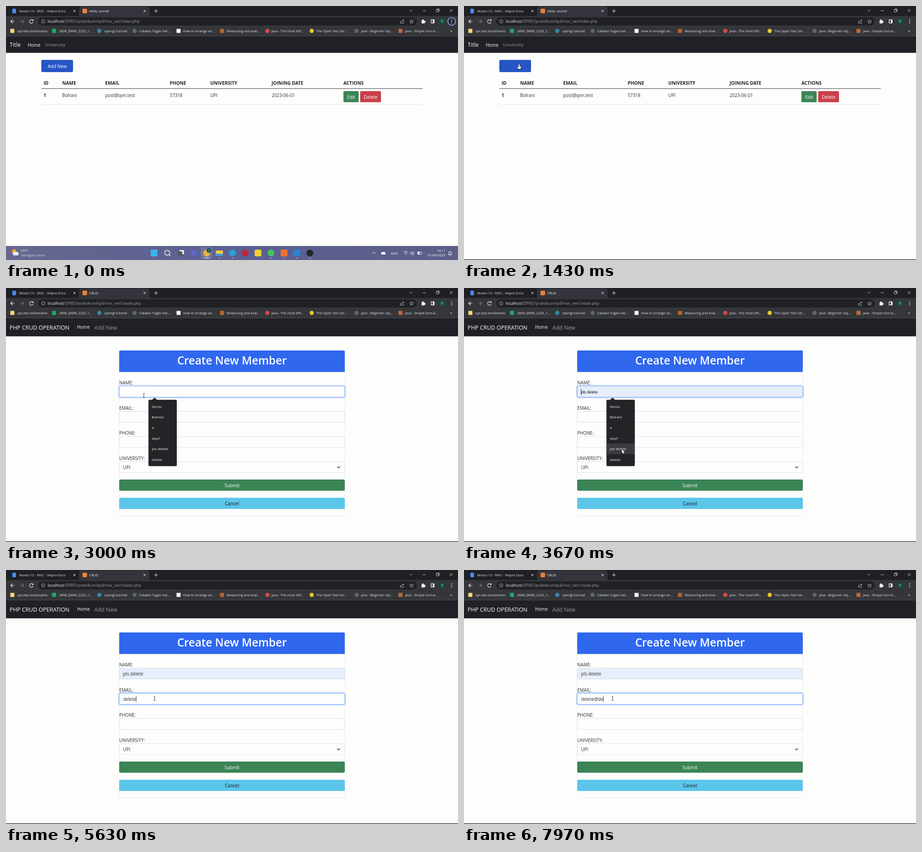
An HTML page with a canvas for the animation above (8000 ms loop, 998x561 px).

```html
<!DOCTYPE html>
<html lang="en">
<head>
<meta charset="utf-8">
<title>Member form</title>
<style>
html, body { margin: 0; width: 100%; height: 100%; overflow: hidden; background: #fdfdfc; }
canvas { display: block; width: 998px; height: 561px; }
</style>
</head>
<body>
<canvas id="stage" width="998" height="561"></canvas>
<script>
const ctx = document.getElementById('stage').getContext('2d');
const LOOP = 8000, PAGE_CHANGE = 1780;
const INK = '#2b2f33', PAPER = '#fdfdfc', PALE = '#e4e6e9';

// Drawing helpers
function box(x, y, w, h, fill, radius = 0, border, width = 0.7) {
  ctx.beginPath();
  ctx.roundRect(x, y, w, h, radius);
  if (fill) { ctx.fillStyle = fill; ctx.fill(); }
  if (border) { ctx.strokeStyle = border; ctx.lineWidth = width; ctx.stroke(); }
}
function dot(x, y, r, fill, border, width = 1) {
  box(x - r, y - r, 2 * r, 2 * r, fill, r, border, width);
}
function stroke(path, color = '#e8eaed', width = 1) {
  ctx.strokeStyle = color;
  ctx.lineWidth = width;
  ctx.stroke(new Path2D(path));
}
// y is the middle of the capital letters
function text(s, x, y, size = 9.9, color = INK, weight = 400, align = 'left', family = '"Open Sans"') {
  ctx.font = `${weight} ${size}px ${family}, sans-serif`;
  ctx.textAlign = align;
  ctx.fillStyle = color;
  ctx.fillText(s, x, y + size * 0.357);
  return ctx.measureText(s).width;
}
function ease(t, from, to) {
  const p = Math.min(1, Math.max(0, (t - from) / (to - from)));
  return p * p * (3 - 2 * p);
}

// Pointer route: time, x, y
const ROUTE = [
  [650, 560, 340], [1350, 121.5, 128.5], [1850, 121.5, 128.5], [2220, 303, 234],
  [2950, 303, 234], [3450, 348.7, 356.5], [3950, 348.7, 356.5], [4500, 328, 284], [LOOP, 328, 284]
];
function pointerAt(t) {
  const i = Math.max(1, ROUTE.findIndex(k => k[0] > t));
  const [t0, x0, y0] = ROUTE[i - 1], [t1, x1, y1] = ROUTE[i];
  const p = ease(t, t0, t1);
  return { x: x0 + (x1 - x0) * p, y: y0 + (y1 - y0) * p };
}
const inside = (p, x, y, w, h) => p.x >= x && p.x <= x + w && p.y >= y && p.y <= y + h;

const ARROW = new Path2D('M0 0V8.6L2.1 6.8 3.5 9.8 4.8 9.2 3.5 6.3H6.2Z');
const HAND = new Path2D('M-1 0Q0-1 1 0V4L4 4.8V8L3 10.5H-1.5L-4 6.5-3 5.5-1 7Z');
function drawPointer(p, shape) {
  ctx.save();
  ctx.translate(p.x, p.y);
  if (shape === 'beam') {
    stroke('M-2-4H2M0-4V4M-2 4H2', '#333', 0.9);
  } else {
    const path = shape === 'hand' ? HAND : ARROW;
    ctx.fillStyle = '#fff';
    ctx.strokeStyle = '#111';
    ctx.lineWidth = 1.2;
    ctx.stroke(path);
    ctx.fill(path);
  }
  ctx.restore();
}

// Browser window
const BOOKMARKS = [
  [14, 'upi.edu bookmarks', '#f5d878', 25, 1], [106, '2808_DMW_2223_1...', '#23a566', 117, 1],
  [206, 'opengl tutroial', '#3c84a8', 217], [284, 'Layanan'.length && 'Catatan Tugas Har...', '#5b6478', 294],
  [381, 'How to arrange an...', '#f2f2f2', 391, 1], [477, 'Measuring and eval...', '#b5652d', 487, 1],
  [577, 'java - The most effi...', '#d14b45', 586], [675, 'The Open Test Ser...', '#e5c62f', 685],
  [774, 'java - Beginner obj...', '#60636a', 784], [871, 'java - Simple turn-b...', '#b9693a', 881, 1]
];
BOOKMARKS[3][1] = 'Catatan Tugas Har...';

function drawBrowser(tab, file, menuRing) {
  box(0, 0, 998, 24, '#1f2024');
  box(161, 1, 156, 26, '#34353c', 5);
  box(0, 22, 998, 45, '#35363a');
  box(0, 66, 998, 1, '#4a4b4f');
  box(14, 6, 8, 10, '#4a8af4', 1);
  text('Modul 10 - MVC - Velpra Docs', 29, 11, 7.5, '#dfe1e5');
  box(169, 6, 10, 10, '#ed8136', 2);
  text(tab, 183.5, 11, 7.5, '#f1f3f4');
  stroke('M148.500 8.500l5 5m0-5l-5 5M303.500 8.500l5 5m0-5l-5 5M327 11h8m-4-4v8');
  stroke('M891 8.500l3 3 3-3M920 10.500h7M950 8h5v5h-5zM951.500 8v-1.500h5v5h-1.500M980 7l6 6m0-6l-6 6', '#e8eaed', 0.8);

  box(71, 25, 836, 18, '#202124', 9);
  stroke('M18.500 34h-8m4-4l-4 4 4 4', '#f1f3f4', 1.2);
  stroke('M31 34h8m-4-4l4 4-4 4', '#77797d', 1.1);
  stroke('M59.500 32a4 4 0 1 0 .3 3.500M60 29.500v3h-3', '#e8eaed', 1.2);
  dot(82, 34, 3.8, null, '#b6b9be', 0.9);
  stroke('M82 33.500v2.500M82 31.500v1', '#b6b9be', 0.9);
  const host = text('localhost', 92, 34, 8.65, '#f1f3f4');
  text('/DPBO/praktikum/tp4/mvc_ver/' + file, 92 + host, 34, 8.65, '#9aa0a6');
  stroke('M871 33v5h7v-2M873 36q0-4 5-4m-2-2l3 2-3 2', '#c4c7cb', 0.9);
  stroke('M895.500 30l1.200 2.800 3 .2-2.300 2 .8 3-2.700-1.600-2.700 1.600 .8-3-2.300-2 3-.2z', '#c4c7cb', 0.9);
  box(917.5, 31.5, 7, 7, '#f1f3f4', 1);
  dot(920.5, 31, 1.6, '#f1f3f4');
  dot(925, 35, 1.6, '#f1f3f4');
  box(938.5, 30.5, 7, 7, null, 0.5, '#f1f3f4', 1.3);
  box(942.5, 30.5, 3, 7, '#f1f3f4');
  dot(963, 34, 7, '#134b46');
  text('D', 963, 34, 7, '#dbe5e4', 400, 'center');
  if (menuRing) dot(984, 34, 8.5, '#26282e', '#8ab4f8', 1.7);
  for (const y of [30.5, 34, 37.5]) dot(984, y, 1, '#f1f3f4');

  for (const [x, label, color, labelX, square] of BOOKMARKS) {
    if (square) box(x - 4.5, 50.5, 9, 9, color, 1);
    else dot(x, 55, 4.7, color);
    text(label, labelX, 55, 7.4, '#e3e5e8');
  }
  text('»', 983, 55, 9, '#e8eaed', 400, 'center');
}

function drawTaskbar(y) {
  ctx.save();
  ctx.translate(0, y - 530);
  const shade = ctx.createLinearGradient(0, 0, 998, 0);
  shade.addColorStop(0, '#66688f');
  shade.addColorStop(0.5, '#5c5f92');
  shade.addColorStop(1, '#5d5e89');
  box(0, 530, 998, 31, shade);
  dot(18, 542, 5, '#f3a62e');
  dot(19, 547, 4, '#e4ecf8');
  dot(24, 547, 4, '#e4ecf8');
  text('29°C', 33, 540, 7.5, '#fff');
  text('Sebagian cerah', 33, 550.5, 7.5, '#d5d7e5');
  box(430, 533, 26, 25, '#71749f', 3);
  box(319.5, 538, 15, 15, '#36b5f0', 1);
  dot(356, 545, 5.5, null, '#eef0f5', 1.5);
  stroke('M360 549l3.500 3.500', '#eef0f5', 1.5);
  box(383, 539, 10, 9, '#e9e9ed', 1);
  box(379, 542, 10, 9, '#55575f', 1);
  dot(414, 545.5, 7, '#6264c7');
  dot(443, 546, 7.5, '#e5b53a');
  dot(448, 540, 5, '#134b46');
  text('D', 448, 540, 5, '#fff', 400, 'center');
  box(463, 540, 16, 12, '#f6c744', 1.5);
  box(463, 547, 16, 5, '#4a9bde', 1);
  dot(500, 545.5, 7.5, '#2b9fd4');
  dot(528, 545.5, 7.5, '#bd2640');
  box(549, 538, 15, 15, '#f2cf2e', 3);
  dot(585, 545.5, 7.5, '#42c75a');
  box(606.5, 538, 15, 15, '#ed7134', 2);
  box(635, 538, 15, 15, '#2786ce', 2);
  dot(671, 545.5, 7.5, '#25262b');
  box(437, 556, 12, 1.7, '#d6d8e8', 1);
  for (const x of [471, 500, 585, 614, 642, 671]) box(x - 2, 556, 4, 1.5, '#b8bad0', 1);
  stroke('M809 547l3.500-3.500 3.500 3.500', '#fff', 1);
  dot(831, 546, 2.7, '#fff');
  dot(834.5, 546, 3, '#fff');
  box(829, 546, 9, 3, '#fff', 1.5);
  text('ENG', 858, 546, 7.3, '#fff', 400, 'center');
  stroke('M877.500 544q5-4.500 10 0M879.500 546.500q3-2.500 6 0M881.500 549h2', '#fff', 1);
  stroke('M893 544.500h2l3-2.500v8l-3-2.500h-2zM900 543.500q2 2.500 0 5', '#fff', 0.9);
  box(909, 543, 9, 5.5, null, 1, '#fff', 0.9);
  box(909, 543, 4, 5.5, '#fff');
  text('14:11', 970, 540, 7.4, '#fff', 400, 'right');
  text('01/06/2023', 970, 550.5, 7.4, '#fff', 400, 'right');
  stroke('M977 549h7l-1-2v-3q-2.500-4-5 0v3zM979.500 551h2', '#fff', 1.1);
  ctx.restore();
}

// Pages
const COLUMNS = [
  [83, 'ID', '1'], [124, 'NAME', 'Bolrani'], [219, 'EMAIL', 'post@qvn.test'], [361.5, 'PHONE', '57318'],
  [451, 'UNIVERSITY', 'UPI'], [586.5, 'JOINING DATE', '2023-06-01'], [745, 'ACTIONS', '']
];
function drawList(hover) {
  box(0, 67, 998, 36.5, '#1f2127');
  text('Title', 8, 86, 12.4, '#fff');
  text('Home', 48, 86, 9.9, '#fff', 500);
  text('University', 86, 86, 9.7, '#97999d');
  box(78, 119, 70, 27, '#2556c4', 3);
  if (!hover) text('Add New', 113, 133, 10, '#fff', 400, 'center');
  COLUMNS.forEach(([x, head, cell], i) => {
    text(head, x, 170, 10.2, '#212529', 700);
    text(cell, x, 197, 9.9, INK, i ? 400 : 700);
  });
  box(78, 182, 842, 1, '#3b3d40');
  box(78, 217.3, 842, 0.8, '#dee2e6');
  box(745, 188, 33.7, 24.5, '#3b8456', 2.6);
  text('Edit', 762, 201, 10, '#fff', 400, 'center');
  box(782, 188, 46, 24.5, '#ca3f4a', 2.6);
  text('Delete', 805, 201, 10, '#fff', 400, 'center');
}

function drawField(y, { value = '', focus = 0, filled, caret, preview } = {}) {
  if (focus) box(249.3, y - 0.7, 499.4, 26, null, 4, `rgba(70,130,245,${0.4 * focus})`, 2.8);
  box(250.3, y + 0.3, 497.4, 24, filled ? '#e6edfb' : PAPER, 2.6, focus > 0.5 ? '#86b7fe' : '#ced4da');
  const width = preview
    ? (text(value, 258.5, y + 13.3, 8.5, '#111', 400, 'left', '"Liberation Sans"'), 0)
    : text(value, 258.5, y + 13);
  if (caret) box(258.2 + width, y + 5.5, 0.9, 13.5, '#222');
}

function drawForm(name, email) {
  box(0, 67, 998, 39.7, '#1f2127');
  text('PHP CRUD OPERATION', 8, 87.5, 12.4, '#fff');
  text('Home', 157, 86, 9.9, '#fff', 500);
  text('Add New', 195, 88, 12.1, '#97999d');
  box(249.8, 138, 498.4, 365.3, null, 2, PALE);
  box(250, 138, 498, 47.5, '#2f67ef', [2, 2, 0, 0]);
  text('Create New Member', 499, 160.5, 24.4, '#fff', 600, 'center');
  ['NAME:', 'EMAIL:', 'PHONE:', 'UNIVERSITY:'].forEach((label, i) => text(label, 250, 209.7 + i * 55.6));
  drawField(216.5, name);
  drawField(272.2, email);
  drawField(327.8);
  drawField(383.4, { value: 'UPI' });
  stroke('M731 394l3.500 3.500 3.500-3.500', '#343a40', 1.3);
  box(250, 423, 498, 24.7, '#3b8456', 2.6);
  text('Submit', 499, 436.5, 10, '#fff', 400, 'center');
  box(250, 463.3, 498, 24.7, '#5bc5ea', 2.6);
  text('Cancel', 499, 476.5, 10, '#111', 400, 'center');
}

const ROW = 23.4;
function drawSuggestions(items, y, w, hovered) {
  ctx.shadowColor = 'rgba(0,0,0,.35)';
  ctx.shadowBlur = 3;
  box(314.7, y, w, items.length * ROW + 5.8, '#232427', 2.5);
  ctx.shadowBlur = 0;
  ctx.fillStyle = '#232427';
  ctx.fill(new Path2D(`M322 ${y + 0.5}l6-5.500 6 5.500z`));
  items.forEach((item, i) => {
    if (i === hovered) box(314.7, y + 2.9 + i * ROW, w, ROW, '#3b3c40');
    text(item, 322, y + 14.8 + i * ROW, 8, '#f1f3f4');
  });
}

// Timeline
const NAMES = ['Denlo', 'Bolrani', 'a', 'wqcf', 'pls delete', 'delete'];
const MAILS = ['denlo1tembus@qvn.test', 'denlo1tembus@surat.test'];
const TYPED = 'delete@de';
const KEY_TIMES = [4990, 5130, 5260, 5370, 5490, 5600, 7710, 7820, 7930];
const NAME_CLICK = 2310, LIST_OPEN = 2880, PICK = 3850, EMAIL_CLICK = 4600;
const blink = (t, since) => Math.floor((t - since) / 530) % 2 === 0;

function draw(t) {
  const pointer = pointerAt(t);
  let shape = 'arrow';
  ctx.clearRect(0, 0, 998, 561);
  box(0, 0, 998, 561, PAPER);

  if (t < PAGE_CHANGE) {
    const hover = t > 650 && inside(pointer, 78, 119, 70, 27);
    if (hover) shape = 'hand';
    drawBrowser('Hello, world!', 'index.php', t < 500);
    drawList(hover);
  } else {
    const listOpen = t >= LIST_OPEN && t < PICK;
    const overList = listOpen && inside(pointer, 314.7, 249.9, 62.3, NAMES.length * ROW - 1);
    const hovered = overList ? Math.floor((pointer.y - 249.9) / ROW) : -1;
    const nameValue = t >= PICK ? 'pls delete' : overList ? NAMES[hovered] : '';
    const nameFocused = t >= NAME_CLICK && t < EMAIL_CLICK;
    const typed = KEY_TIMES.filter(k => k <= t).length;
    const lastInput = typed ? KEY_TIMES[typed - 1] : EMAIL_CLICK;

    drawBrowser('CRUD', 'create.php');
    drawForm({
      value: nameValue,
      filled: nameValue !== '',
      preview: overList,
      focus: ease(t, NAME_CLICK + 20, NAME_CLICK + 120) * (1 - ease(t, EMAIL_CLICK, EMAIL_CLICK + 100)),
      caret: nameFocused && (overList || blink(t, t < PICK ? NAME_CLICK : PICK))
    }, {
      value: TYPED.slice(0, typed),
      focus: ease(t, EMAIL_CLICK, EMAIL_CLICK + 100),
      caret: t >= EMAIL_CLICK && blink(t, lastInput)
    });
    if (listOpen) drawSuggestions(NAMES, 247, 62.3, hovered);
    if (typed === 1) drawSuggestions(MAILS, 302, 116.7, -1);
    const overField = [217, 272, 328].some(y => inside(pointer, 250, y, 498, 24));
    if (overField && !overList) shape = 'beam';
  }

  const hidden = ease(t, 800, 980);
  if (hidden < 1) drawTaskbar(530 + 31 * hidden);
  else box(0, 559.7, 998, 1.3, '#15161a');
  if (t > 650) drawPointer(pointer, shape);
}

function frame() {
  draw(performance.now() % LOOP);
  requestAnimationFrame(frame);
}
frame();
</script>
</body>
</html>
```
